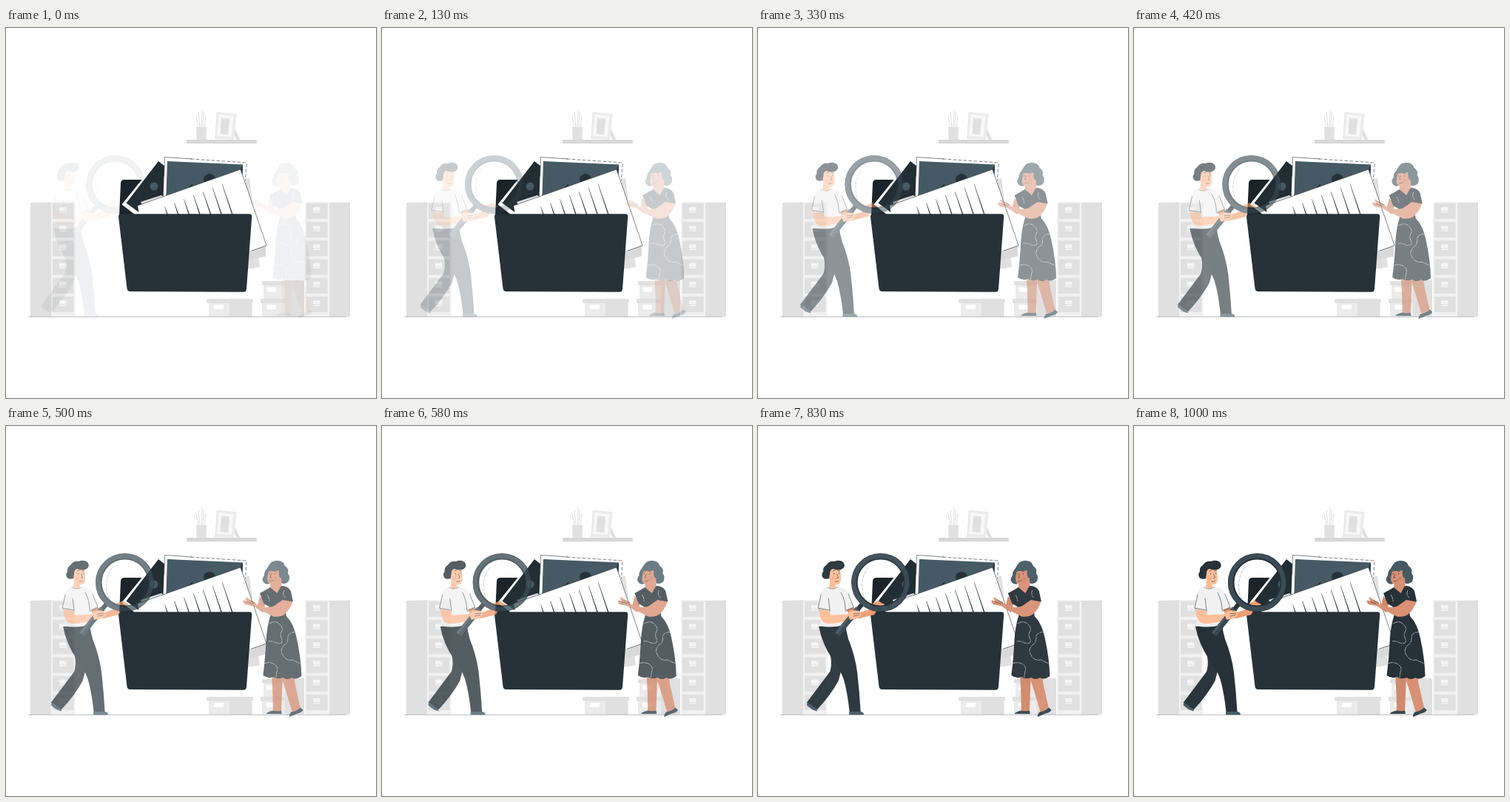
Animation, 500 px wide and 500 px high, one loop 1040 ms. Source, as an HTML page:

```html
<!DOCTYPE html>
<html lang="en">
<head>
<meta charset="utf-8">
<title>Folder search</title>
<style>
  html, body { margin: 0; width: 100%; height: 100%; overflow: hidden; background: #fff; }
  svg { display: block; width: 100%; height: 100%; }
  .ink { fill: #263238; }
  .slate { fill: #455a64; }
  .deep { fill: #37474f; }
  .g1 { fill: #e0e0e0; }
  .g2 { fill: #ebebeb; }
  .w { fill: #fff; }
  .skin { fill: #ffbe98; }
  .shade { fill: #ef9d70; }
  .tan { fill: #d99073; }
  .tan2 { fill: #d2886a; }
  .line { fill: none; stroke: #263238; stroke-width: .6; stroke-linecap: round; }
</style>
</head>
<body>
<svg viewBox="0 0 500 500">
  <g id="room">
    <!-- shelf -->
    <path fill="#d8d8d8" d="M244 151h95v5.200h-95z"/>
    <path class="g1" d="M257 134h14l-.6 17h-12.800zM308 134l8.500 17h-4.500l-5-8z"/>
    <path fill="none" stroke="#dcdcdc" stroke-width=".9" d="M260 134l-3-15M262 134l-2-20M264 134l1-24M266 134l1-21M268 134l2-16"/>
    <path class="g2" d="M284.500 113.500l27 2.500-3.500 35-26-1z"/>
    <path fill="#f8f8f8" d="M287.500 117l20 1.700-2.700 28-19.500-1z"/>
    <path class="g1" d="M291 121.500l11 .8-1.800 21.700-11-.8z"/>
    <g id="cabinets"></g>
    <!-- boxes -->
    <path class="g1" d="M302 366h32v5h-1.500v19H302zM376 341h27v49h-27z"/>
    <path class="g2" d="M274 370h28v20h-28zM348 346h29v20h-29zM346 370h31v20h-31z"/>
    <path class="g1" d="M271 366h32v5.500h-32zM346 342h32v5.500h-32zM344 366h33v5.500h-33z"/>
    <path class="w" d="M281 374h13v6h-13zM352 350.500h13v6h-13zM352 374h13v6h-13z"/>
    <path stroke="#a9adaf" stroke-width=".8" d="M30 390.300H460"/>
  </g>

  <g id="folder">
    <path fill="#1a2429" d="M155 210q0-5 5-5h23q4 0 6 4l4 7h130v38H153z"/>
    <path class="g1" d="M290 206l39-3 14 120.500-25 3.500z"/>
    <path fill="#dadada" d="M320 300l31-7v15.500l-26 6z"/>
    <!-- tilted print -->
    <path class="w" d="M156.500 238.500L204 179.500l44 35-45 60z"/>
    <path fill="#222e34" d="M162.500 236.500L206 180l9 7 27 22-42 55z"/>
    <circle class="slate" cx="200" cy="214" r="5.500"/>
    <!-- landscape print -->
    <path class="w" d="M214.500 174.500l110.500 7.500-4 90H211z"/>
    <path class="line" d="M213.500 200l1-25.500 36 2.400"/>
    <path class="line" stroke-dasharray="4 3" d="M250 177l75 5-1.500 24"/>
    <path class="slate" d="M218 180l102 4.500-3 80H215z"/>
    <circle class="ink" cx="275" cy="205" r="8"/>
    <path class="ink" d="M240 222l11-11 10 10z"/>
    <path class="g1" d="M182 235l28-9 20 14-45 2z"/>
    <!-- written sheet -->
    <path class="w" d="M178 240L317 191l35 103-30 10-140-40z"/>
    <path class="line" d="M178 240L317 191l35 103-20 7"/>
    <path class="ink" d="M317 191l3-6-.8 13z"/>
    <g id="text"></g>
    <path class="ink" d="M155 251.200H329q3.500 0 3.200 4L325 352.700q-.5 4-4 4L168 356.100q-4 0-4.500-4L152 255q0-3.800 3-3.800z"/>
  </g>

  <g id="man">
    <!-- far arm -->
    <path class="shade" d="M117 240l13 5 6 8 18-6 7 3-3 5-20 5q-9 1-14-4z"/>
    <!-- legs -->
    <path fill="#2a363c" d="M94 296q9 20 4 36L66.500 374l14 9.500q18-19 29-39l8-30z"/>
    <path class="ink" d="M83 271l36-4q1 11 4 21 9 22 12 45 3 27 4.500 53h-15q-3-27-8-44-5-14-15-27-14-20-18.500-44z"/>
    <path class="slate" d="M68 373.500l12 9 1 3q-7-1-14.500-8.500zM124 386h16q4 1 4 4.200h-20z"/>
    <!-- shirt -->
    <path fill="#f1f1f1" d="M95 217l14 0q10 1 13 8l8 20-10 4v19q-18 6-36 2l4-22-6-2q1-18 6-25 3-3 7-4z"/>
    <path class="line" d="M86 228l-4 18 16 3M98 249l-2-16M120 249l10-4-7-18M113 225q6 11 6 24"/>
    <path class="line" stroke-dasharray="1 1.500" d="M83 248l15 3M120 250.500l10-4"/>
    <!-- head -->
    <path class="skin" d="M96 192h15q3 10 1.500 18-1.500 5-7 4.500l.5 4q-5 3-9-.5l1-10-5-5z"/>
    <path class="ink" d="M97 206q-7 2-9-2-2-4 1-7-1-6 4-9 4-6 11-5 7-3 12 1 4 5-1 9-5 3-13 0-4 1-4 6z"/>
    <path class="line" d="M103.500 199v1.500M110.500 198.500v1.500M107.500 200l2 5-2 .5M105 210q3 1 4.500-.5M102 196l3-1M109 195.500l2.500.5"/>
    <circle cx="102" cy="206" r="2" fill="#f39b7d" opacity=".6"/>
    <path class="line" stroke-dasharray="1 1.500" d="M95 218q6 4 13 0"/>
    <!-- near arm -->
    <path class="skin" d="M83.500 247.500l14.500 3 1 5 21-1 9-5 9 1 2 4-3 5-10 3-17 3q-14 3-20 0-6-4-6.500-18z"/>
    <!-- magnifier -->
    <path class="shade" d="M155 240l9-4 2 2 6 3-3 3-12 2z"/>
    <path class="line" stroke-dasharray="4 2" opacity=".5" d="M150 191q-14 18-5 43"/>
    <path fill="none" stroke="#263238" stroke-width="6" d="M143 239L128 257"/>
    <path fill="none" stroke="#37474f" stroke-width="8" d="M136 247L108 281.500"/>
    <path fill="none" stroke="#455a64" stroke-width="3" d="M134.500 245.500L106.500 280"/>
    <circle cx="166.500" cy="211.500" r="35.300" fill="none" stroke="#263238" stroke-width="8.600"/>
    <circle cx="166.200" cy="211.500" r="36" fill="none" stroke="#3a4c55" stroke-width="6"/>
    <!-- gripping fingers -->
    <path class="skin" d="M122 253l8-4 8 1 2 4-3 5-12 3z"/>
    <path class="line" stroke="#d98f6c" d="M130 254l8-1M130 257l7-1.500"/>
  </g>

  <g id="woman">
    <!-- far arm -->
    <path class="tan2" d="M337 230l8 8-4 14-13-9-11-2-3-4 6-1-3-3 13 5 4 5z"/>
    <!-- legs -->
    <path class="tan2" d="M353 332h15l-1 30-1 25h-11l-.5-25z"/>
    <path class="tan" d="M364 332h18l3 18 7 31-11 6-9-30z"/>
    <path class="deep" d="M355 384.500q6 1.500 11 0l1 4.500h-21q0-2.500 9-4.500zM379.500 386.500q7-1 12.500-6l3.500 3q0 3-9 5.500l-9 4q-2-1 2-6.500z"/>
    <!-- dress -->
    <path class="ink" d="M337 226l9-5 5-3 17-2q8 1 11 7l3 14-11 6 2 14q10 10 14 30 6 28 6.500 51-8 6-13 2-7 4-12 0-9 3-13-1-7 3-14-2 3-24 4-45 1-21 6-36l-2-12-7-4z"/>
    <path fill="none" stroke="#e8eaea" stroke-width=".6" stroke-dasharray="7 .8"
      d="M350 267q9-5 14 1 6 5 2 11-2 4 1 9 2 8-8 5-5-3-10-2M387 279q-9-2-12 5 1 9-5 12-7 7-1 15 5 7 12 5l11 5M343 321q8-3 14 1 6 4 3 10l-1 8M370 222q-3 6 2 10M347 228q3 4 3 9M362 241q7 0 8 9"/>
    <!-- head -->
    <path class="slate" d="M348 192q3-11 13-10 8 0 10 7 6 4 4 10 4 5 1 11-4 5-11 2-8 3-15 1-5 2-8-2-3-4 1-9 0-7 5-10z"/>
    <path class="tan" d="M349 194q9-1 15 1l2 10 .5 10-6 11-9.500-8 .5-4.500q-4-1-4.500-7z"/>
    <path class="slate" d="M346 195q3-11 14-9 10 2 9 13l-4 7q-3-3-2-11-8 2-17 0z"/>
    <path class="line" d="M350 199v1.500M357.500 199v1.500M352.500 200l-1.500 5h2M351 209.500q3 1 5-1M348.500 196.500l2.500-.5M356 196l3 .5"/>
    <circle cx="359" cy="206" r="2.200" fill="#c7735f" opacity=".5"/>
    <!-- near arm -->
    <path class="tan" d="M368 235l13.500 2.500q-3 10-11 17-6 4-15 3l-18-9-9-5-9-3-5-4 1-1 6 2-4-5 1.500-1 8 6 5 3.500 14 4 9-1z"/>
    <path class="line" stroke="#b87560" d="M320 238l7 2M323 235l7 4"/>
  </g>
</svg>
<script>
const $ = id => document.getElementById(id);

// Filing cabinets: front at x, side panel at side
const cabinet = (x, side) => {
  let s = `<path class="g1" d="M${side} 236l28-.500v154.500h-28z"/>
    <path fill="#f1f1f1" d="M${x} 235h32.500v155h-32.500z"/>`;
  for (let i = 0; i < 6; i++) {
    const y = 237 + i * 25.2;
    s += `<path class="g1" d="M${x + 2} ${y}h28.500v21h-28.500z"/>
      <path fill="#f5f5f5" d="M${x + 11} ${y + 5}h9.500v5h-9.500zM${x + 11} ${y + 11}h9.500v1.500h-9.500z"/>`;
  }
  return s;
};
$('cabinets').innerHTML = cabinet(61, 33) + cabinet(404, 437);

let lines = '';
for (let i = 0; i < 7; i++) {
  const x = 292 - 12.9 * i, y = 211 + 5.1 * i, end = x + (252 - y) * .34;
  lines += `<path class="ink" d="M${x - .2} ${y}h.5L${end + .7} 252h-1.400z"/>`;
}
$('text').innerHTML = lines;

// cubic-bezier(0, 0, .58, 1)
function easeOut(x) {
  let lo = 0, hi = 1;
  for (let i = 0; i < 24; i++) {
    const s = (lo + hi) / 2;
    if (s * s * (1.74 - .74 * s) < x) lo = s; else hi = s;
  }
  return lo * lo * (3 - 2 * lo);
}

const LOOP = 1040, STEP = 1000 / 24, SLIDE = 20;

function enter(id, dir, p) {
  $(id).setAttribute('transform', `translate(${dir * SLIDE * (1 - p)} 0)`);
  $(id).setAttribute('opacity', p);
}

let start;
function draw(now) {
  start ??= now;
  const step = Math.floor(((now - start) % LOOP + 4) / STEP);
  const p = easeOut(Math.min(1, (step + 1) / 25));
  enter('man', -1, p);
  enter('woman', 1, p);
  requestAnimationFrame(draw);
}
draw(performance.now());
</script>
</body>
</html>
```
